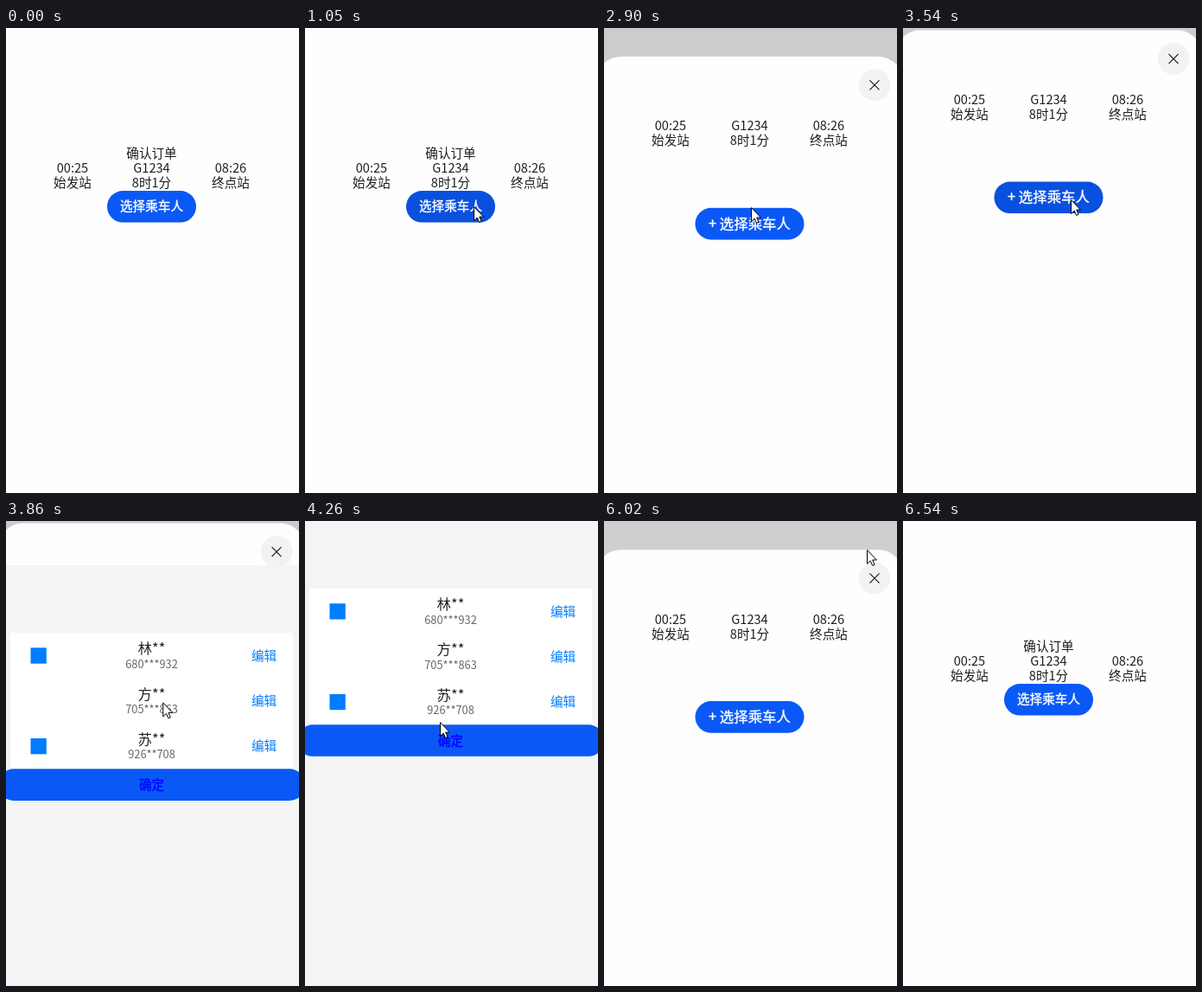
Write an HTML page that moves like this. It is 339 px wide and 537 px high and loops after 7740 ms.

```html
<!DOCTYPE html>
<html lang="zh-CN">
<head>
<meta charset="utf-8">
<style>
  html, body { margin: 0; width: 100%; height: 100%; overflow: hidden; background: #fefefe; }
  svg { display: block; }
  text { font-family: "Noto Sans CJK SC", "Noto Sans CJK", "Noto Sans", sans-serif; text-anchor: middle; white-space: pre; }
  .medium { stroke: currentColor; stroke-width: .35; }
</style>
</head>
<body>
<svg id="stage" width="339" height="537" viewBox="0 0 339 537"></svg>
<script>
const LOOP = 7740, H = 537, TOP = 2.6, MID = 168.5;
const BLUE = '#0a59f7', PRESSED = '#0950de', LINK = '#007dfe', INK = '#1e1e1e';
const SMALL = 14.6, LARGE = 16.46;

// Text centred on (x, y)
const text = (s, x, y, size = SMALL, color = INK, extra = '') =>
  `<text x="${x}" y="${y + size * .36}" font-size="${size}" fill="${color}" color="${color}" ${extra}>${s}</text>`;

const rect = (x, y, w, h, color, extra = '') =>
  `<rect x="${x}" y="${y}" width="${w}" height="${h}" fill="${color}" ${extra}/>`;

const button = (id, y, w, label, size, color) =>
  rect(MID - w / 2, y, w, 36.6, BLUE, `rx="18.3" id="${id}"`) +
  text(label, MID, y + 18, size, color, 'class="medium"');

const trip = y =>
  ['00:25 始发站', 'G1234 8时1分', '08:26 终点站'].map((s, i) => {
    const x = MID + (i - 1) * 91.5;
    return s.split(' ').map((line, row) => text(line, x, y + row * 17)).join('');
  }).join('');

const passenger = (s, i) => {
  const y = 78 + i * 52.3, [name, card] = s.split(' ');
  return rect(5, y, 327, 52.4, '#fff') +
    (i % 2 ? '' : rect(28.5, y + 17.3, 18.3, 18.3, LINK)) +
    text(name, MID, y + 18.3, LARGE, '#222') +
    text(card, MID, y + 36.2, 12.8, '#666') +
    text('编辑', 298.5, y + 26.3, SMALL, LINK);
};

const people = ['林** 680***932', '方** 705***863', '苏** 926**708'];

document.getElementById('stage').innerHTML = `
  ${rect(0, 0, 339, H, '#fefefe')}
  ${text('确认订单', MID, 144.5)}
  ${trip(161.5)}
  ${button('choose', 188, 103, '选择乘车人', SMALL, '#fff')}
  ${rect(0, 0, 339, H, '#000', 'id="dim"')}
  <g id="sheet">
    ${rect(-9.2, 0, 355.4, 600, '#fefefe', 'rx="29"')}
    <circle id="close" cx="313" cy="33" r="18.3"/>
    <path d="M307.5 27.5l11 11m0-11l-11 11" stroke="#1a1a1a" stroke-width="1.2"/>
    ${trip(80.3)}
    ${button('add', 174.9, 126, '+ 选择乘车人', LARGE, '#fff')}
  </g>
  <g id="cover">
    ${rect(0, 0, 339, H, '#f4f4f4')}
    ${people.map(passenger).join('')}
    ${button('confirm', 235.3, 355.4, '确定', SMALL, '#00f')}
  </g>
  <path id="cursor" d="M.5 .5V16.5L4.2 13L6.6 18.4L9 17.3L6.7 12H11.4Z" fill="#fff" stroke="#000"/>`;

const el = id => document.getElementById(id);
const clamp = v => Math.max(0, Math.min(1, v));

// Damped spring from 0 to 1 (stiffness 328, damping 34)
function spring(ms) {
  if (ms <= 0) return 0;
  const t = ms / 1000, w = Math.sqrt(328 - 17 * 17);
  return 1 - Math.exp(-17 * t) * (Math.cos(w * t) + 17 / w * Math.sin(w * t));
}

// Pointer moves in order; it rests between them
const moves = [
  { from: 160, to: 760, x: 195, y: 206 },
  { from: 1050, to: 1530, x: 246, y: 220 },
  { from: 1690, to: 2170, x: 170, y: 207 },
  { from: 2960, to: 3300, x: 194, y: 198 },
  { from: 3660, to: 4260, x: 156, y: 232 },
  { from: 4260, to: 4580, x: 161, y: 255 },
  { from: 4840, to: 5180, x: 305, y: 64 },
  { from: 5180, to: 5460, x: 304, y: 33 },
  { from: 6080, to: 6500, x: 345, y: 62 }
];

function moveCursor(t) {
  let x = 14, y = 510;
  for (const m of moves) {
    const k = clamp((t - m.from) / (m.to - m.from));
    x += (m.x - x) * k;
    y += (m.y - y) * k;
  }
  el('cursor').style.display = t >= 160 && t < 6500 ? '' : 'none';
  el('cursor').setAttribute('transform', `translate(${x} ${y})`);
}

// Slides a layer up to its top edge; shown runs from 0 to 1
function slide(id, shown, top) {
  el(id).style.display = shown > .002 ? '' : 'none';
  el(id).setAttribute('transform', `translate(0 ${H - (H - top) * shown})`);
}

function press(id, t, down, up = down + 110, dark = PRESSED, light = BLUE) {
  el(id).setAttribute('fill', t >= down && t < up ? dark : light);
}

function draw(t) {
  slide('sheet', spring(t - 2671) - spring(t - 6000), TOP);
  slide('cover', spring(t - 3660) - spring(t - 4830), 0);
  el('dim').setAttribute('opacity', .2 * (clamp((t - 2665) / 240) - clamp((t - 6000) / 300)));
  press('choose', t, t < 2000 ? 1050 : 2580);
  press('add', t, 3540);
  press('confirm', t, 4740);
  press('close', t, 5900, 6010, '#dadada', '#f2f2f2');
  moveCursor(t);
}

const start = performance.now();
function tick() {
  draw((performance.now() - start) % LOOP);
  requestAnimationFrame(tick);
}
tick();
</script>
</body>
</html>
```
